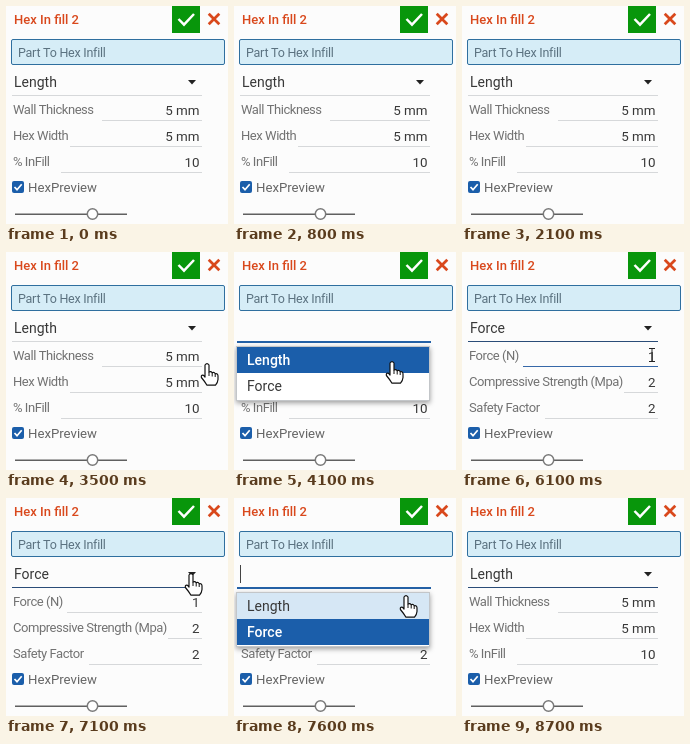
An HTML page with a canvas for the animation above (9.1 s loop, 222 px wide and 218 px high).

```html
<!DOCTYPE html>
<html lang="en">
<head>
<meta charset="utf-8">
<title>Hex infill panel</title>
<style>
html, body { margin: 0; width: 100%; height: 100%; overflow: hidden; background: #fcfcfc; }
canvas { display: block; width: 222px; height: 218px; }
</style>
</head>
<body>
<canvas id="stage"></canvas>
<script>
const W = 222, H = 218, LOOP = 9100, STEP = 100;
const canvas = document.getElementById('stage');
const ctx = canvas.getContext('2d');
const ratio = window.devicePixelRatio || 1;
canvas.width = W * ratio;
canvas.height = H * ratio;

const INK = '#383838', LABEL = '#727272', BLUE = '#1b5eaa', NAVY = '#2a4c78';
const ORANGE = '#d9481c', HOVER = '#d6e7f5', RULE = '#d6d8da';

const OPEN_A = 3800, PICK_A = 5700, OPEN_B = 7600, PICK_B = 8100;

// Pointer path: time, x, y of the hot spot
const PATH = [
  [3000, 217, 172], [3200, 205, 130], [3500, 201, 112], [3700, 186, 77],
  [3900, 172, 98], [4100, 158, 110], [4400, 158, 110], [4800, 156, 114],
  [5000, 156, 114], [5300, 151, 127], [5500, 149, 131], [5700, 149, 133],
  [5800, 160, 126], [6000, 160, 126], [6100, 190, 103], [6400, 190, 103],
  [6600, 190, 101], [6800, 190, 101], [7100, 185, 76], [7500, 185, 76],
  [7600, 172, 98], [7900, 172, 101], [8100, 175, 104], [8500, 224, 132]
];

function pointerAt(t) {
  const last = PATH.length - 1;
  if (t < PATH[0][0] || t >= PATH[last][0]) return null;
  const i = PATH.findIndex(p => p[0] > t);
  const [t0, x0, y0] = PATH[i - 1], [t1, x1, y1] = PATH[i];
  const k = (t - t0) / (t1 - t0);
  return { x: Math.round(x0 + (x1 - x0) * k), y: Math.round(y0 + (y1 - y0) * k) };
}

function rect(x, y, w, h, color) {
  ctx.fillStyle = color;
  ctx.fillRect(x, y, w, h);
}

function stroke(points, color, width) {
  ctx.beginPath();
  points.forEach(([x, y], i) => i ? ctx.lineTo(x, y) : ctx.moveTo(x, y));
  ctx.strokeStyle = color;
  ctx.lineWidth = width;
  ctx.stroke();
}

function text(str, x, y, size, color, { align = 'left', weight = 400, gap = 0 } = {}) {
  ctx.font = `${weight} ${size}px Roboto, "Open Sans", sans-serif`;
  ctx.letterSpacing = gap + 'px';
  ctx.textAlign = align;
  ctx.fillStyle = color;
  ctx.fillText(str, x, y);
}

function header() {
  text('Hex In fill 2', 8, 18, 13, ORANGE, { weight: 500 });
  rect(166, 0, 28, 27, '#08960b');
  stroke([[172.5, 13], [178, 18.7], [188, 8]], '#fff', 2.5);
  stroke([[202.7, 7.7], [213.3, 18.3]], ORANGE, 2.7);
  stroke([[213.3, 7.7], [202.7, 18.3]], ORANGE, 2.7);
  ctx.beginPath();
  ctx.roundRect(5.5, 33.5, 213, 25, 1.5);
  ctx.fillStyle = '#d6edf7';
  ctx.fill();
  ctx.strokeStyle = '#2f6f9f';
  ctx.lineWidth = 1;
  ctx.stroke();
  text('Part To Hex Infill', 12, 51, 12.5, '#5b7280', { gap: -0.25 });
}

function row(label, value, y, start, focused) {
  text(label, 7, y, 13, LABEL, { gap: -0.45 });
  text(value, 193.5, y + 1, 13.4, INK, { align: 'right' });
  rect(start, y + 6, 196 - start, 1, focused ? '#3668a8' : RULE);
}

function rows(force, focused) {
  if (force) {
    row('Force (N)', '1', 108, 61, focused);
    row('Compressive Strength (Mpa)', '2', 134, 162);
    row('Safety Factor', '2', 160, 83);
  } else {
    row('Wall Thickness', '5 mm', 108, 96);
    row('Hex Width', '5 mm', 134, 64);
    row('% InFill', '10', 160, 55);
  }
}

function footer() {
  ctx.beginPath();
  ctx.roundRect(6, 175, 12, 12, 2);
  ctx.fillStyle = BLUE;
  ctx.fill();
  stroke([[8.5, 181], [11, 183.7], [15.7, 178.3]], '#fff', 1.7);
  text('HexPreview', 22, 186, 13.2, '#666');
  rect(9, 207.5, 112, 1.5, '#606060');
  ctx.beginPath();
  ctx.arc(86.5, 208, 5.2, 0, Math.PI * 2);
  ctx.fillStyle = '#fff';
  ctx.fill();
  ctx.strokeStyle = '#7a7a7a';
  ctx.lineWidth = 1.5;
  ctx.stroke();
}

function select(name, focused) {
  text(name, 8, 81, 14, INK);
  ctx.beginPath();
  ctx.moveTo(182, 74);
  ctx.lineTo(190, 74);
  ctx.lineTo(186, 78.5);
  ctx.fillStyle = '#222';
  ctx.fill();
  rect(6, 89, 190, 1, focused ? NAVY : RULE);
}

function menu(chosen, pointer, caret) {
  rect(3, 89, 194, 2, '#2461a6');
  if (caret) rect(6, 67, 1, 18, '#444');
  ctx.save();
  ctx.shadowColor = 'rgba(0,0,0,.38)';
  ctx.shadowBlur = 5 * ratio;
  ctx.shadowOffsetY = 2 * ratio;
  rect(2, 94, 194, 55, '#fff');
  ctx.restore();
  ctx.strokeStyle = '#c3c6c9';
  ctx.lineWidth = 1;
  ctx.strokeRect(2.5, 94.5, 193, 54);
  ['Length', 'Force'].forEach((name, i) => {
    const top = 95 + i * 26;
    const over = pointer && pointer.y >= top && pointer.y < top + 26;
    const picked = name === chosen;
    if (picked) rect(3, top, 192, 26, BLUE);
    else if (over) rect(3, top, 192, 26, HOVER);
    text(name, 13, top + 18, 14, picked ? '#fff' : INK, { weight: picked ? 500 : 400 });
  });
}

function hand({ x, y }) {
  ctx.save();
  ctx.translate(x, y);
  const shape = new Path2D(
    'M-2 1 Q0 -1.6 2 1 V8 Q4 6.8 5.2 8.8 Q7.2 7.8 8.2 9.8 ' +
    'Q10.8 9 11 11.8 V15.5 Q10.8 18.5 8.5 21.2 H0 Q-2.5 17.2 -5.6 13.5 ' +
    'Q-6.2 10.5 -3.4 11.4 L-2 13 Z');
  ctx.fillStyle = '#fff';
  ctx.fill(shape);
  ctx.lineJoin = 'round';
  ctx.strokeStyle = '#111';
  ctx.lineWidth = 1.2;
  ctx.stroke(shape);
  stroke([[2, 8], [2, 12]], '#111', 1);
  stroke([[5.2, 9], [5.2, 12.5]], '#111', 1);
  stroke([[8.2, 10], [8.2, 13]], '#111', 1);
  ctx.restore();
}

function beam({ x, y }) {
  rect(x - 0.5, y - 7, 1, 14, '#222');
  rect(x - 3, y - 7, 6, 1, '#222');
  rect(x - 3, y + 6, 6, 1, '#222');
}

function draw(t) {
  const first = t >= OPEN_A && t < PICK_A;
  const second = t >= OPEN_B && t < PICK_B;
  const open = first || second;
  const force = t >= PICK_A && t < PICK_B;
  const pointer = pointerAt(t);

  ctx.setTransform(ratio, 0, 0, ratio, 0, 0);
  rect(0, 0, W, H, '#fcfcfc');
  header();
  rows(force, t >= 6100 && t < 6900);
  footer();
  if (open) menu(force ? 'Force' : 'Length', pointer, second && t < 8000);
  else select(force ? 'Force' : 'Length', t >= PICK_A);

  if (pointer) {
    const overField = !open && pointer.y > 91 && pointer.y < 168 && pointer.x < 197;
    (overField ? beam : hand)(pointer);
  }
}

function tick(now) {
  draw(Math.floor((now % LOOP) / STEP) * STEP);
  requestAnimationFrame(tick);
}
requestAnimationFrame(tick);
</script>
</body>
</html>
```
